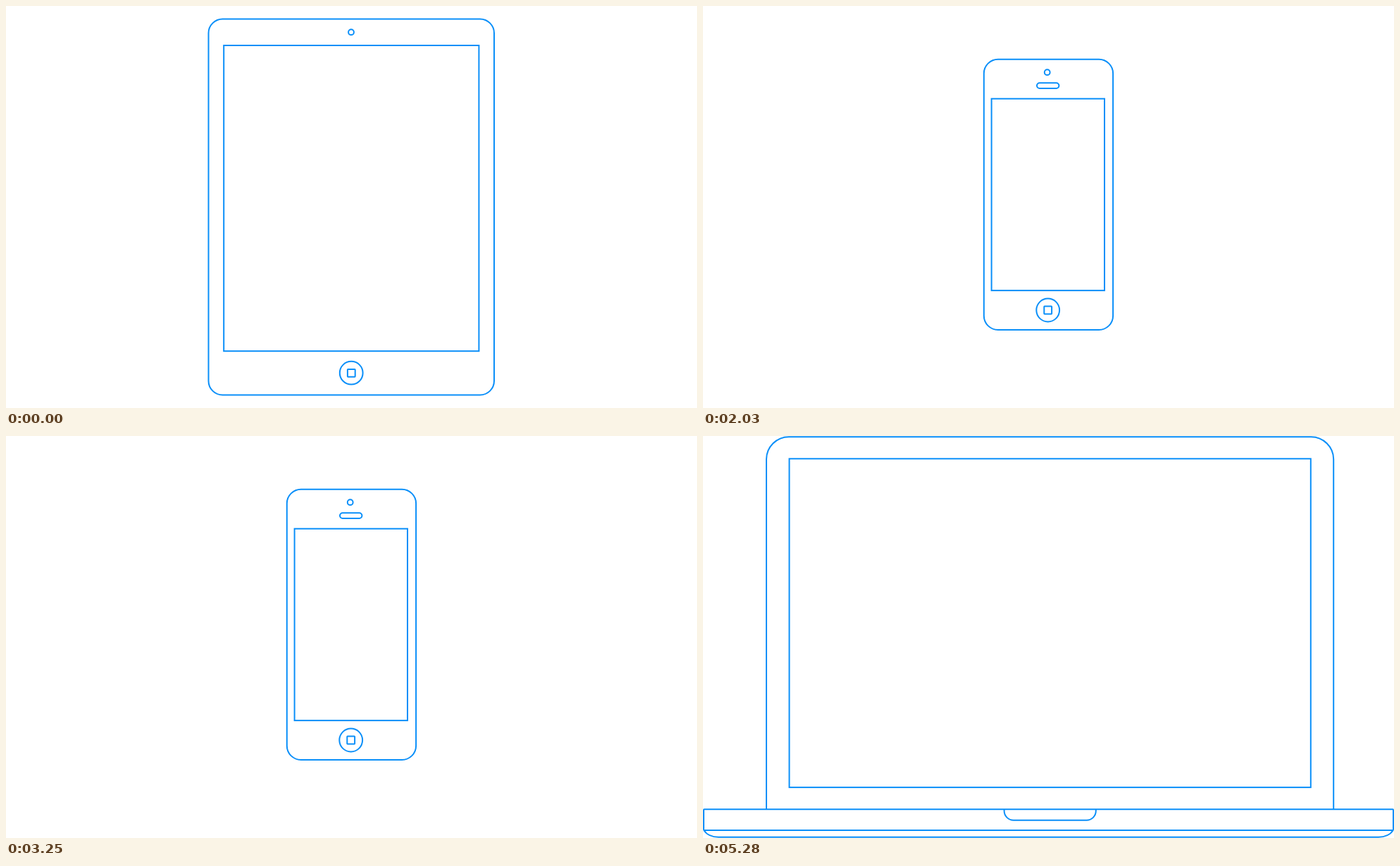
Write an HTML page that moves like this. It is 981 px wide and 571 px high and loops after 6090 ms.

```html
<!DOCTYPE html>
<html lang="en">
<head>
<meta charset="utf-8">
<title>Devices</title>
<style>
  html, body { margin: 0; width: 100%; height: 100%; overflow: hidden; background: #fff; }
  svg { display: block; width: 981px; height: 571px; }
  g { fill: none; stroke: #0a8ff9; stroke-width: 2; visibility: hidden; }
</style>
</head>
<body>
<svg viewBox="0 0 981 571">
  <g id="tablet">
    <rect x="287.5" y="18.5" width="405.5" height="534" rx="20"/>
    <circle cx="490" cy="37.2" r="3.9"/>
    <rect x="309.2" y="56" width="362.2" height="434.2"/>
    <circle cx="490.2" cy="521.2" r="16.4"/>
    <rect x="484.9" y="515.9" width="10.8" height="10.8" rx=".6"/>
  </g>
  <g id="phone">
    <rect x="398.8" y="75.8" width="183.3" height="384.2" rx="20"/>
    <circle cx="488.7" cy="94.2" r="3.9"/>
    <rect x="474" y="109.2" width="31.4" height="7.8" rx="3.9"/>
    <rect x="409.6" y="131.7" width="160.4" height="272.4"/>
    <circle cx="489.7" cy="432" r="16.4"/>
    <rect x="484.3" y="426.6" width="10.8" height="10.8" rx=".6"/>
  </g>
  <g id="laptop">
    <path d="M90 530V33A32 32 0 0 1 122 1.2H863.2A32 32 0 0 1 895.2 33V530"/>
    <rect x="122.5" y="32.3" width="740.3" height="466.8"/>
    <rect x="1" y="530.2" width="979" height="29.7" rx=".8"/>
    <path d="M427.6 530V532.5A13.2 13.2 0 0 0 440.8 545.7H544.6A13.2 13.2 0 0 0 557.8 532.5V530"/>
    <path d="M1.3 560C5 566 13 569.8 22 569.8H959C968 569.8 976 566 979.7 560"/>
  </g>
</svg>
<script>
  const hold = 2030;
  const devices = ['tablet', 'phone', 'laptop'].map(id => document.getElementById(id));

  function draw(now) {
    const current = Math.floor(now / hold) % devices.length;
    devices.forEach((el, i) => {
      el.style.visibility = i === current ? 'visible' : 'hidden';
    });
  }

  const start = performance.now();
  function tick() {
    draw(performance.now() - start);
    requestAnimationFrame(tick);
  }
  tick();
</script>
</body>
</html>
```
